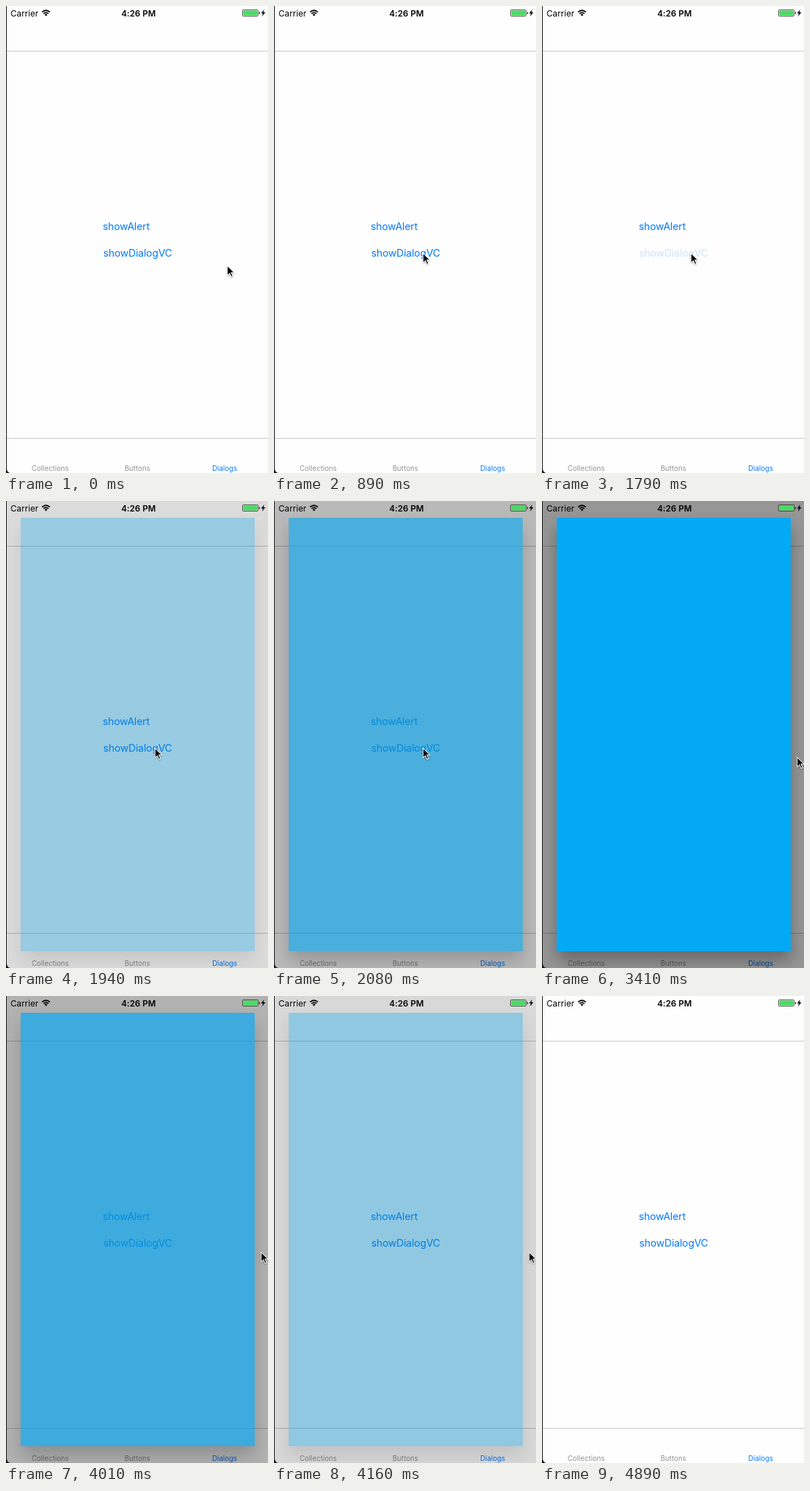
Animation, 375 px wide and 667 px high, one loop 5500 ms. Source, as an HTML page:

```html
<!DOCTYPE html>
<html lang="en">
<head>
<meta charset="utf-8">
<title>Dialog demo</title>
<style>
  html, body { margin: 0; width: 100%; height: 100%; overflow: hidden; background: #fff; }
  svg { display: block; width: 375px; height: 667px; }
  text { font-family: Inter, Roboto, sans-serif; }
  .button { font-size: 14.5px; letter-spacing: -.1px; fill: #007aff; }
  .tab { font-size: 10px; letter-spacing: .06px; text-anchor: middle; fill: #929292; }
  .tab.active { fill: #007aff; }
  .status { font-size: 12px; letter-spacing: .1px; }
  .clock { font-weight: 600; text-anchor: middle; }
</style>
</head>
<body>
<svg viewBox="0 0 375 667" xmlns="http://www.w3.org/2000/svg">
  <defs>
    <filter id="blur" filterUnits="userSpaceOnUse" x="-40" y="-40" width="455" height="780">
      <feGaussianBlur stdDeviation="12"/>
    </filter>
    <filter id="soft" filterUnits="userSpaceOnUse" x="-4" y="-4" width="24" height="28">
      <feGaussianBlur stdDeviation=".8"/>
    </filter>
  </defs>

  <rect width="375" height="667" fill="#fefefe"/>
  <path d="M0 64.5H375M0 617.5H375" stroke="#c8c8c8"/>
  <text class="button" x="138.5" y="320">showAlert</text>
  <text class="button" id="opener" x="139.2" y="358">showDialogVC</text>
  <text class="tab" x="63.3" y="664">Collections</text>
  <text class="tab" x="188" y="664">Buttons</text>
  <text class="tab active" x="313" y="664">Dialogs</text>

  <rect id="dim" width="375" height="667" opacity="0"/>
  <g id="dialog" opacity="0">
    <rect x="21" y="38" width="335" height="619" opacity=".3" filter="url(#blur)"/>
    <rect x="21" y="24" width="335" height="619" fill="#03a9f4"/>
  </g>

  <text class="status" x="6.5" y="14.5">Carrier</text>
  <text class="status clock" x="189.7" y="14.5">4:26 PM</text>
  <g fill="none" stroke="#000" stroke-width="1.7">
    <path d="M51.6 8.7Q57.2 3.8 62.8 8.7M53.6 10.9Q57.2 7.7 60.8 10.9"/>
    <path d="M55.2 12.2Q57.2 10.4 59.2 12.2L57.2 14.4Z" fill="#000" stroke="none"/>
  </g>
  <rect x="338.5" y="5.5" width="22.5" height="9" rx="1.5" fill="none" stroke="#333" stroke-width=".8"/>
  <rect x="339.5" y="6.5" width="20.5" height="7" rx=".6" fill="#4cd964"/>
  <path d="M362 8.2Q363.6 8.6 363.6 10T362 11.8Z" fill="#333"/>
  <path d="M369.6 5L365 10.6H367.7L366.4 14.9L371.2 9.1H368.4Z"/>
  <path d="M0 0H1V661Q1.5 666 6 667H0Z" fill="#111"/>

  <g id="cursor">
    <path d="M0 1V17L3.7 13.6L6 18.5L9 17.3L6.8 12.2H11.5Z" opacity=".35" filter="url(#soft)"/>
    <path d="M0 0V16L3.7 12.6L6 17.5L9 16.3L6.8 11.2H11.5Z" fill="#fff"/>
    <path d="M1 2.3V13.7L4 10.9L6.5 16.2L7.7 15.7L5.3 10.3H9.2Z"/>
  </g>
</svg>
<script>
  const LOOP = 5500, STEP = 148.1;
  const [opener, dim, dialog, cursor] =
    ['opener', 'dim', 'dialog', 'cursor'].map(id => document.getElementById(id));

  const ramp = (k, from, length) => Math.max(0, Math.min(1, (k - from) / length));
  const smooth = u => u * u * (3 - 2 * u);
  const easeOut = u => 1 - (1 - u) ** 2;

  // Pointer path: reach the button, leave to the right edge, settle, drop away.
  function pointerAt(k) {
    const out = smooth(ramp(k, 17.9, 2.33));
    const settle = smooth(ramp(k, 21, 2));
    const drop = smooth(ramp(k, 31, 2));
    return [
      316.3 - 103.5 * easeOut(ramp(k, 0.87, 4.8)) + 155.7 * out - 3.8 * settle - 23 * drop,
      370 - 18 * smooth(ramp(k, 0, 6)) + 11.5 * Math.sqrt(out) + 1.5 * settle + 62 * drop
    ];
  }

  function draw(t) {
    const k = Math.floor((t + 3) / STEP);
    const shown = ramp(k, 12, 3.3) - ramp(k, 26, 3);
    dialog.setAttribute('opacity', shown);
    dim.setAttribute('opacity', 0.41 * Math.min(1, shown * 1.1));
    opener.setAttribute('opacity', k >= 8 && k < 13 ? 0.2 : 1);
    cursor.setAttribute('visibility', k < 33 ? 'visible' : 'hidden');
    cursor.setAttribute('transform', `translate(${pointerAt(k).join(' ')})`);
  }

  const start = performance.now();
  function tick() {
    draw((performance.now() - start) % LOOP);
    requestAnimationFrame(tick);
  }
  tick();
</script>
</body>
</html>
```
